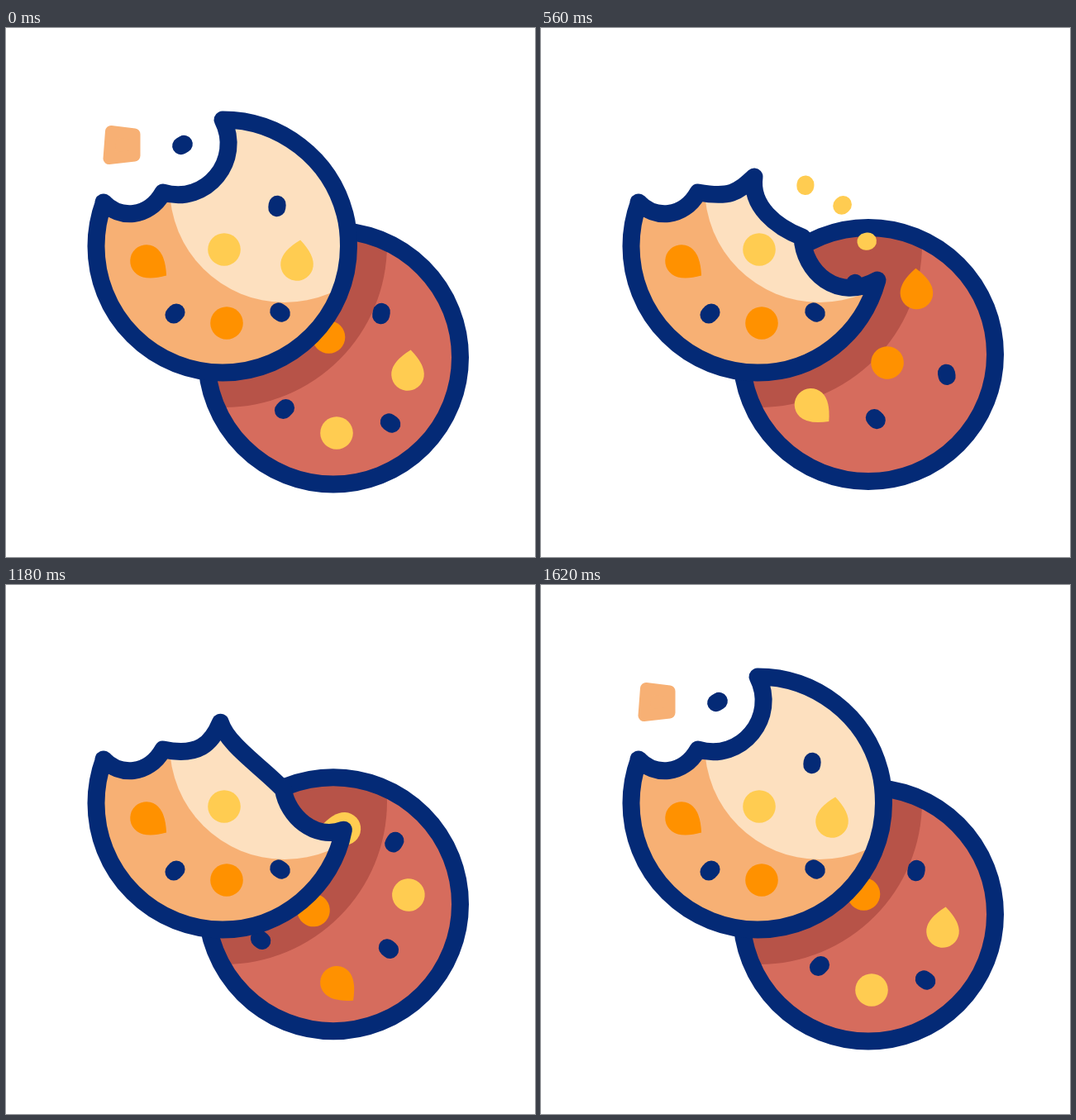
These frames come from a looping animation (640 by 640 pixels, 1720 ms). An HTML page with a canvas:

```html
<!DOCTYPE html>
<html lang="en">
<head>
<meta charset="utf-8">
<title>Cookies</title>
<style>
html, body { margin: 0; width: 100%; height: 100%; overflow: hidden; background: #fff; }
canvas { display: block; width: 640px; height: 640px; }
</style>
</head>
<body>
<canvas id="stage" width="640" height="640"></canvas>
<script>
const ctx = document.getElementById('stage').getContext('2d');
const LOOP = 1720, STEP = 20, TURN = 1600;
const NAVY = '#042a76', ORANGE = '#ff9100', YELLOW = '#ffcc51', DOUGH = '#f7b074',
      CREAM = '#fde0bf', RED = '#d66c5d', DARK = '#b75348';
const rad = deg => deg * Math.PI / 180;
const clamp = v => Math.max(0, Math.min(1, v));
const span = (t, a, b) => clamp((t - a) / (b - a));
const smooth = u => (1 - Math.cos(Math.PI * u)) / 2;
const mix = (a, b, u) => a + (b - a) * u;

// Edge from the small notch to the bottom of the front cookie: four cubic curves.
const WHOLE = [242.4,214.7, 287,159.6, 262,111, 331.5,111, 392.3,157.8, 410,225,
  413.4,237.8, 414.5,251, 414.5,264, 414.5,348.5, 346.5,417, 262,417];
const BITTEN = [235,207, 250,197, 268,163, 295,200, 340,212, 387,175,
  405.4,201, 414.5,232, 414.5,264, 414.5,348.5, 346.5,417, 262,417];
const SMALL = [231,206, 238,198, 258,180, 253,216, 285,241, 316,253,
  318,295, 358,332, 407,305, 388.6,371.5, 331,417, 262,417];
const REGROWN = [237,211, 268,181, 262,141, 294,150, 355,183, 371,237,
  382,252, 402,268, 411,280, 408,354, 340,417, 262,417];

const easeIn = u => Math.pow(u, 1.5);
const easeOut = u => 1 - Math.pow(1 - u, 1.5);
const MORPHS = [
  [120, 270, WHOLE, BITTEN, smooth],
  [380, 510, BITTEN, SMALL, smooth],
  [1040, 1320, SMALL, REGROWN, easeIn],
  [1320, 1580, REGROWN, WHOLE, easeOut]
];

function edgeAt(t) {
  let edge = WHOLE;
  for (const [start, end, from, to, ease] of MORPHS) {
    if (t < start) break;
    const u = ease(span(t, start, end));
    edge = from.map((v, i) => mix(v, to[i], u));
  }
  return edge;
}

function disc(x, y, r, color) {
  ctx.fillStyle = color;
  ctx.beginPath();
  ctx.arc(x, y, r, 0, Math.PI * 2);
  ctx.fill();
}

function line(x1, y1, x2, y2, color) {
  ctx.strokeStyle = color;
  ctx.lineWidth = 21;
  ctx.beginPath();
  ctx.moveTo(x1, y1);
  ctx.lineTo(x2, y2);
  ctx.stroke();
}

function seed(x, y, deg) {
  const dx = Math.cos(rad(deg)) * 2.2, dy = Math.sin(rad(deg)) * 2.2;
  line(x - dx, y - dy, x + dx, y + dy, NAVY);
}

function drop(x, y, deg, color) {
  ctx.save();
  ctx.translate(x, y);
  ctx.rotate(rad(deg));
  ctx.fillStyle = color;
  ctx.beginPath();
  ctx.moveTo(29.8, 0);
  ctx.quadraticCurveTo(14, 19.8, 0, 19.8);
  ctx.arc(0, 0, 19.8, Math.PI / 2, -Math.PI / 2);
  ctx.quadraticCurveTo(14, -19.8, 29.8, 0);
  ctx.fill();
  ctx.restore();
}

function bobHeight(t) {
  const stops = [398.5, 386, 412, 386, 398.5];
  const k = Math.min(t, TURN - 0.001) / (TURN / 4), i = Math.floor(k);
  return mix(stops[i], stops[i + 1], smooth(k - i));
}

function backCookie(t) {
  const y = bobHeight(t);
  disc(396, y, 153.5, RED);
  ctx.save();
  ctx.beginPath();
  ctx.arc(396, y, 153.5, 0, Math.PI * 2);
  ctx.clip();
  disc(264, 262, 197, DARK);
  ctx.translate(396, y);
  ctx.rotate(Math.min(t / TURN, 1) * Math.PI * 2);
  disc(4, 91.5, 19.8, YELLOW);
  disc(-5.5, -24.5, 19.8, ORANGE);
  drop(90, 20.5, -83, YELLOW);
  drop(-94.6, -3.5, 142, ORANGE);
  seed(-59, 62.5, -45);
  seed(58, -53, -80);
  seed(69, 79.5, 35);
  seed(-36, -91, -46);
  ctx.restore();
  ctx.strokeStyle = NAVY;
  ctx.lineWidth = 21;
  ctx.beginPath();
  ctx.arc(396, y, 153.5, 0, Math.PI * 2);
  ctx.stroke();
}

function frontCookie(t) {
  const edge = edgeAt(t), outline = new Path2D();
  outline.moveTo(118, 211);
  outline.bezierCurveTo(137, 231, 172, 231, 190, 199);
  for (let i = 0; i < edge.length; i += 6) outline.bezierCurveTo(...edge.slice(i, i + 6));
  outline.arc(262, 264, 153, Math.PI / 2, rad(200.2));
  outline.closePath();

  ctx.save();
  ctx.clip(outline);
  ctx.fillStyle = DOUGH;
  ctx.fillRect(90, 90, 350, 350);
  disc(337, 193, 139, CREAM);
  disc(264, 268, 19.8, YELLOW);
  disc(267, 357, 19.8, ORANGE);
  drop(170, 282, 36, ORANGE);
  seed(204.5, 345.5, -45);
  seed(331.5, 344, 35);
  ctx.globalAlpha = t < 1000 ? 1 - span(t, 380, 460) : span(t, 1255, 1560);
  drop(352, 286, -82, YELLOW);
  seed(328, 215.5, -84);
  ctx.restore();

  ctx.strokeStyle = NAVY;
  ctx.lineWidth = 21;
  ctx.stroke(outline);
}

function looseBits(t) {
  const away = t < 1000 ? Math.pow(span(t, 0, 260), 1.3) : 0;
  ctx.save();
  ctx.globalAlpha = t < 1000 ? 1 - span(t, 160, 260) : span(t, 1340, 1580);
  ctx.save();
  ctx.translate(-165 * away, -87 * away);
  ctx.fillStyle = ctx.strokeStyle = DOUGH;
  ctx.lineWidth = 14;
  ctx.beginPath();
  ctx.moveTo(127, 125);
  ctx.lineTo(155.5, 128.5);
  ctx.lineTo(155.5, 154.5);
  ctx.lineTo(124.5, 158);
  ctx.closePath();
  ctx.fill();
  ctx.stroke();
  ctx.restore();
  seed(213.5 - 80 * away, 141.5 - 90 * away, -30);
  ctx.restore();
}

function crumbs(t, start, rays) {
  const u = (t - start) / 200;
  if (u <= 0 || u >= 1) return;
  const head = 40 * Math.pow(1 - u, 3), tail = 40 * Math.pow(1 - u, 1.2);
  for (const [x, y, deg] of rays) {
    const dx = Math.cos(rad(deg)), dy = Math.sin(rad(deg));
    line(x - dx * head, y - dy * head, x - dx * tail, y - dy * tail, YELLOW);
  }
}

function draw(now) {
  const t = Math.min(Math.floor((now % LOOP) / STEP) * STEP, 1620);
  ctx.fillStyle = '#fff';
  ctx.fillRect(0, 0, 640, 640);
  ctx.lineCap = ctx.lineJoin = 'round';
  backCookie(t);
  frontCookie(t);
  looseBits(t);
  crumbs(t, 200, [[297.5, 136.5, -116], [335.5, 133, -83], [366.5, 147.5, -45]]);
  crumbs(t, 380, [[320, 189, -86], [365.5, 213.5, -45], [395.5, 258, -8]]);
}

let origin;
function tick(now) {
  origin ??= now;
  draw(now - origin);
  requestAnimationFrame(tick);
}
draw(0);
requestAnimationFrame(tick);
</script>
</body>
</html>
```
